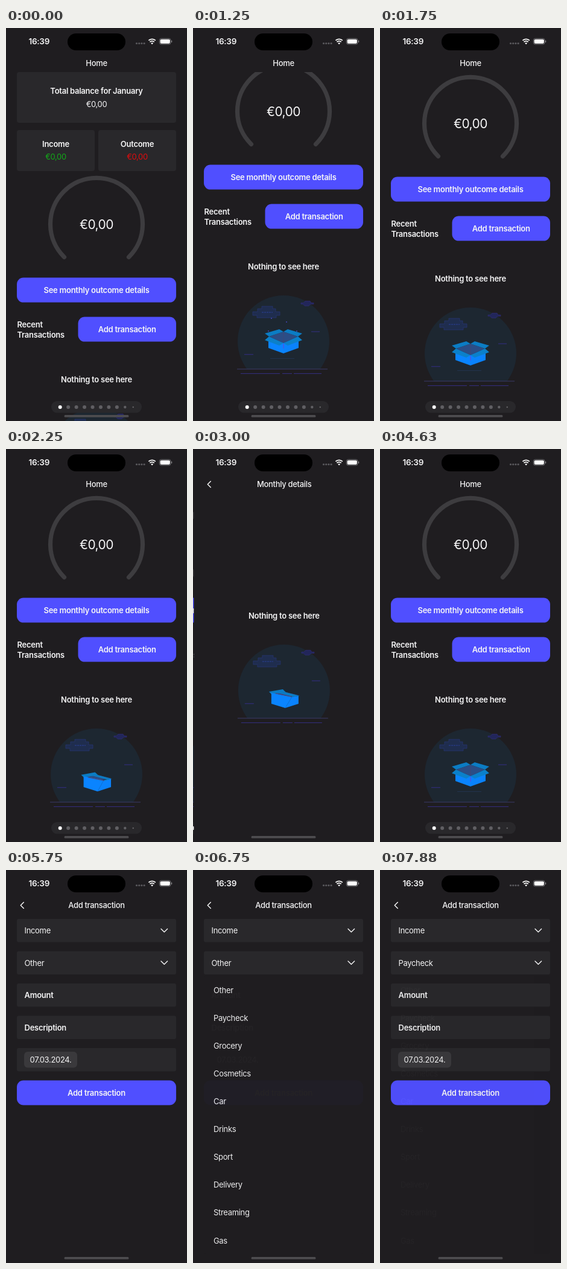
An HTML page for the animation above (8 s loop, 300 by 651 pixels).

```html
<!DOCTYPE html>
<html lang="en">
<head>
<meta charset="utf-8">
<style>
  html, body { margin: 0; width: 100%; height: 100%; overflow: hidden; background: #1f1d20; }
  svg { display: block; width: 100%; height: 100%; }
  text { font-family: Inter, Roboto, "Liberation Sans", sans-serif; letter-spacing: -0.025em; white-space: pre; }
  text[font-weight="600"] { letter-spacing: -0.02em; }
</style>
</head>
<body>
<svg id="stage" viewBox="0 0 300 651">
  <defs>
    <clipPath id="scrollClip"><rect y="73" width="300" height="578"/></clipPath>
    <clipPath id="skyClip"><rect x="-80" y="-80" width="160" height="126"/></clipPath>
  </defs>
</svg>
<script>
const LOOP = 8000;
const BG = '#1f1d20', CARD = '#29282b', BLUE = '#504fff', WHITE = '#f5f5f6';
const OPEN_DETAILS = 2605, CLOSE_DETAILS = 3900, OPEN_FORM = 4985;
const stage = document.getElementById('stage');

function add(parent, tag, attrs = {}) {
  const el = document.createElementNS('http://www.w3.org/2000/svg', tag);
  set(el, attrs);
  return parent.appendChild(el);
}
function set(el, attrs) {
  for (const key in attrs) el.setAttribute(key, attrs[key]);
}
const group = (parent, attrs) => add(parent, 'g', attrs);
const box = (parent, x, y, width, height, rx, fill) =>
  add(parent, 'rect', { x, y, width, height, rx, fill });
const dot = (parent, cx, cy, r, fill) => add(parent, 'circle', { cx, cy, r, fill });
const stroke = (parent, d, color, width, extra = {}) =>
  add(parent, 'path', { d, fill: 'none', stroke: color, 'stroke-width': width, ...extra });

// y is the middle of the capital letters
function label(parent, str, x, y, { size = 13, weight = 400, anchor = 'middle', fill = WHITE } = {}) {
  const el = add(parent, 'text', {
    x, y: y + size * 0.36, 'font-size': size, 'font-weight': weight, 'text-anchor': anchor, fill
  });
  el.textContent = str;
  return el;
}
const BOLD = { weight: 600 };
const LEFT = { anchor: 'start' };

function button(parent, str, x, y, w) {
  const h = 41;
  box(parent, x, y, w, h, 11, BLUE);
  label(parent, str, x + w / 2, y + h / 2, BOLD);
}
const shift = (el, x, y) => el.setAttribute('transform', `translate(${x.toFixed(2)} ${y.toFixed(2)})`);

const clamp = x => Math.max(0, Math.min(1, x));
function smooth(t, a, b) {
  const x = clamp((t - a) / (b - a));
  return x * x * (3 - 2 * x);
}
// Critically damped spring from 0 to 1
function spring(t, start) {
  const x = Math.max(0, t - start) * 0.019;
  return 1 - (1 + x) * Math.exp(-x);
}

// Carton parts: fill, open outline, closed outline
const PARTS = [
  ['#2b4d86', [-24, -8, 0, -16, 24, -8, 0, 3], [-21, 4, 0, 2, 24, 8, 2, 11]],
  ['#0b7cc4', [-24, -8, 0, -16, -7, -20, -31, -13], [-21, 6, 3, 3, -2, -2, -25, 2]],
  ['#0b7cc4', [24, -8, 0, -16, 7, -20, 31, -13], [26, 9, 3, 3, -10, 4, 14, 10]],
  ['#0a84ff', [-25, -7, 0, 3, 0, 20, -25, 11], [-21, 4, 13, 10.5, 2, 29, -21, 22]],
  ['#0a82fc', [25, -7, 0, 3, 0, 20, 25, 11], [24, 9, 13, 10.5, 2, 29, 24, 22]],
  ['#0b80ca', [-24, -8, 0, 3, -7, 7, -31, -2], [-21, 4, 2, 8, 2, 8, -14, 5]],
  ['#0b80ca', [24, -8, 0, 3, 7, 7, 31, -2], [24, 8, 13, 10, 14, 11, 22, 9]]
];

function emptyArt(parent, x, y) {
  const g = group(parent, { transform: `translate(${x} ${y})` });
  add(g, 'circle', { r: 76, fill: '#1d2731', 'clip-path': 'url(#skyClip)' });
  add(g, 'path', {
    d: 'M-51-49h8v-5h7v-4h18v4h5v5h7v6h-6v4h-32v-4h-7z',
    fill: '#1f2d4e', stroke: '#293680', 'stroke-width': 0.6
  });
  stroke(g, 'M-36-48h18', '#2b46ad', 0.8, { 'stroke-dasharray': '3 1' });
  add(g, 'path', {
    d: 'M29-63.7h4l3-3h8l2 3h4v2h-5l-3 3h-7l-3-3h-3z',
    fill: '#22265a', stroke: '#353083', 'stroke-width': 0.6
  });
  stroke(g, 'M-65 21.8h15M46-16h14', '#372f91', 0.9);
  stroke(g, 'M-77 46H73', '#3b3a68', 1);
  stroke(g, 'M-71 53.4h65M-2 53.4h16M17 53.4h46', '#352e83', 1);
  const shadow = stroke(g, 'M-22 28.5h40', '#25395a', 0.7);
  const faces = PARTS.map(([fill]) => add(g, 'polygon', { fill }));
  const seam = stroke(g, 'M0 4v8', '#5b4be0', 1.2);
  const fold = stroke(g, 'M0-15.5V2', '#4a4470', 0.7);
  const slit = stroke(g, 'M-14 4.8L13 10.3', '#4b4a80', 1.3);
  const sparks = [[5, -32], [-20, -38], [-25, -17], [22, -17]].map(([sx, sy]) => dot(g, sx, sy, 0.9, '#4a48c8'));

  return t => {
    const phase = ((t % 3000) + 3000) % 3000;
    const open = smooth(phase, 600, 1050) * (1 - smooth(phase, 1900, 2330));
    PARTS.forEach(([, up, down], i) =>
      set(faces[i], { points: up.map((v, k) => (down[k] + (v - down[k]) * open).toFixed(2)).join(' ') }));
    for (const part of [seam, fold, shadow]) set(part, { opacity: open * open });
    set(slit, { opacity: 1 - open });
    const glow = smooth(phase, 950, 1150) * (1 - smooth(phase, 1350, 1580));
    sparks.forEach(s => {
      set(s, { opacity: glow });
      shift(s, 0, (1250 - phase) * 0.02);
    });
  };
}

function chevronDown(parent, y) {
  stroke(parent, `M257 ${y - 2.5}l5.3 5.3l5.3-5.3`, WHITE, 1.4,
    { 'stroke-linecap': 'round', 'stroke-linejoin': 'round' });
}

// Home
const home = group(stage);
const content = group(group(home, { 'clip-path': 'url(#scrollClip)' }));
box(content, 18, 73, 264, 84, 4, CARD);
label(content, 'Total balance for January', 150, 104, BOLD);
label(content, '€0,00', 150, 126);
box(content, 18, 169, 129, 68, 4, CARD);
label(content, 'Income', 82.5, 192, BOLD);
label(content, '€0,00', 82.5, 213.5, { fill: '#12aa18' });
box(content, 153, 169, 129, 68, 4, CARD);
label(content, 'Outcome', 217.5, 192, BOLD);
label(content, '€0,00', 217.5, 213.5, { fill: '#e30b0d' });
stroke(content, 'M96.5 379.5A76.5 76.5 0 1 1 203.5 379.5', '#3d3c3f', 7.2, { 'stroke-linecap': 'round' });
label(content, '€0,00', 150, 325.5, { size: 21 });
button(content, 'See monthly outcome details', 18, 413.6, 264);
label(content, 'Recent', 18.5, 491, { ...BOLD, ...LEFT });
label(content, 'Transactions', 18.5, 508, { ...BOLD, ...LEFT });
button(content, 'Add transaction', 119.5, 478.6, 162.5);
label(content, 'Nothing to see here', 150, 582, BOLD);
const homeArt = emptyArt(content, 150, 706);

box(home, 75, 618, 150, 19.5, 9.7, CARD);
for (let i = 0; i < 10; i++) {
  const r = i < 8 ? 3 : i === 8 ? 2.2 : 1.3;
  dot(home, 89.7 + i * 13.45, 628, r, i ? '#605f63' : '#ffffff');
}

// Monthly details
const details = group(stage);
box(details, 0, 0, 300, 651, 0, BG);
label(details, 'Nothing to see here', 149.5, 276.5, BOLD);
const detailsArt = emptyArt(details, 149.5, 400);

// Add transaction
const form = group(stage);
box(form, 0, 0, 300, 651, 0, BG);
for (let i = 0; i < 5; i++) box(form, 18, 81 + i * 53.5, 264, 38.5, 3, CARD);
label(form, 'Income', 30.5, 100.5, LEFT);
chevronDown(form, 100);
const category = label(form, 'Other', 30.5, 154, LEFT);
chevronDown(form, 153.5);
label(form, 'Amount', 30.5, 207.5, { ...BOLD, ...LEFT });
label(form, 'Description', 30.5, 261, { ...BOLD, ...LEFT });
box(form, 30, 301, 88, 26.5, 6, '#3a393c');
label(form, '07.03.2024.', 74, 314.5);
button(form, 'Add transaction', 18, 348.5, 264);

const menu = group(form);
box(menu, 18, 176, 264, 460, 3, BG);
['Other', 'Paycheck', 'Grocery', 'Cosmetics', 'Car', 'Drinks', 'Sport', 'Delivery', 'Streaming', 'Gas']
  .forEach((name, i) => label(menu, name, 34, 199 + i * 46.1, LEFT));

// Header
const header = group(stage);
const TITLE = { weight: 500 };
const homeTitle = label(header, 'Home', 150, 58.5, TITLE);
const detailsTitle = label(header, 'Monthly details', 150.5, 58.5, TITLE);
const formTitle = label(header, 'Add transaction', 150, 58.5, TITLE);
const back = stroke(header, 'M29.3 53.5L24.3 58.5L29.3 63.5', WHITE, 1.5,
  { 'stroke-linecap': 'round', 'stroke-linejoin': 'round' });

// Status bar and home indicator
box(stage, 102, 9, 96, 28, 14, '#000');
label(stage, '16:39', 54.8, 22.5, { size: 13.6, weight: 600 });
for (let i = 0; i < 4; i++) dot(stage, 216.5 + i * 4.2, 25.5, 1.6, '#5a595d');
stroke(stage, 'M236.4 20.6a8.2 8.2 0 0 1 11.4 0M238.5 23.2a5.2 5.2 0 0 1 7.2 0', '#fff', 1.8);
add(stage, 'path', { d: 'M242.1 27.2l-2-2.1a2.9 2.9 0 0 1 4 0z', fill: '#fff' });
add(stage, 'rect', { x: 254.3, y: 17.4, width: 18.8, height: 9.6, rx: 3, fill: 'none', stroke: '#858488', 'stroke-width': 0.8 });
box(stage, 255.6, 18.7, 16.2, 7, 1.9, '#fff');
box(stage, 274, 20.5, 1.2, 3.4, 0.6, '#858488');
box(stage, 96.5, 641, 107, 3.8, 1.9, '#4d4c4f');

function render(t) {
  const scroll = 187 * smooth(t, 840, 1230) - 20 * smooth(t, 1280, 1750);
  shift(content, 0, -scroll);

  const showDetails = spring(t, OPEN_DETAILS) * (1 - spring(t, CLOSE_DETAILS));
  const showForm = spring(t, OPEN_FORM);
  const away = Math.max(showDetails, showForm);
  shift(home, -90 * away, 0);
  shift(details, 300 * (1 - showDetails), 0);
  shift(form, 300 * (1 - showForm), 0);
  homeArt(t);
  detailsArt(t - OPEN_DETAILS);

  shift(homeTitle, -110 * away, 0);
  set(homeTitle, { opacity: clamp(1 - away * 1.3) });
  shift(detailsTitle, 150 * (1 - showDetails), 0);
  set(detailsTitle, { opacity: showDetails });
  shift(formTitle, 150 * (1 - showForm), 0);
  set(formTitle, { opacity: showForm });
  set(back, { opacity: away });

  const fade = t < 7320 ? smooth(t, 6300, 6800) : Math.exp((7320 - t) / 150);
  set(menu, { opacity: fade });
  category.textContent = t < 7360 ? 'Other' : 'Paycheck';
}

const begin = performance.now();
function tick() {
  render((performance.now() - begin) % LOOP);
  requestAnimationFrame(tick);
}
tick();
</script>
</body>
</html>
```
